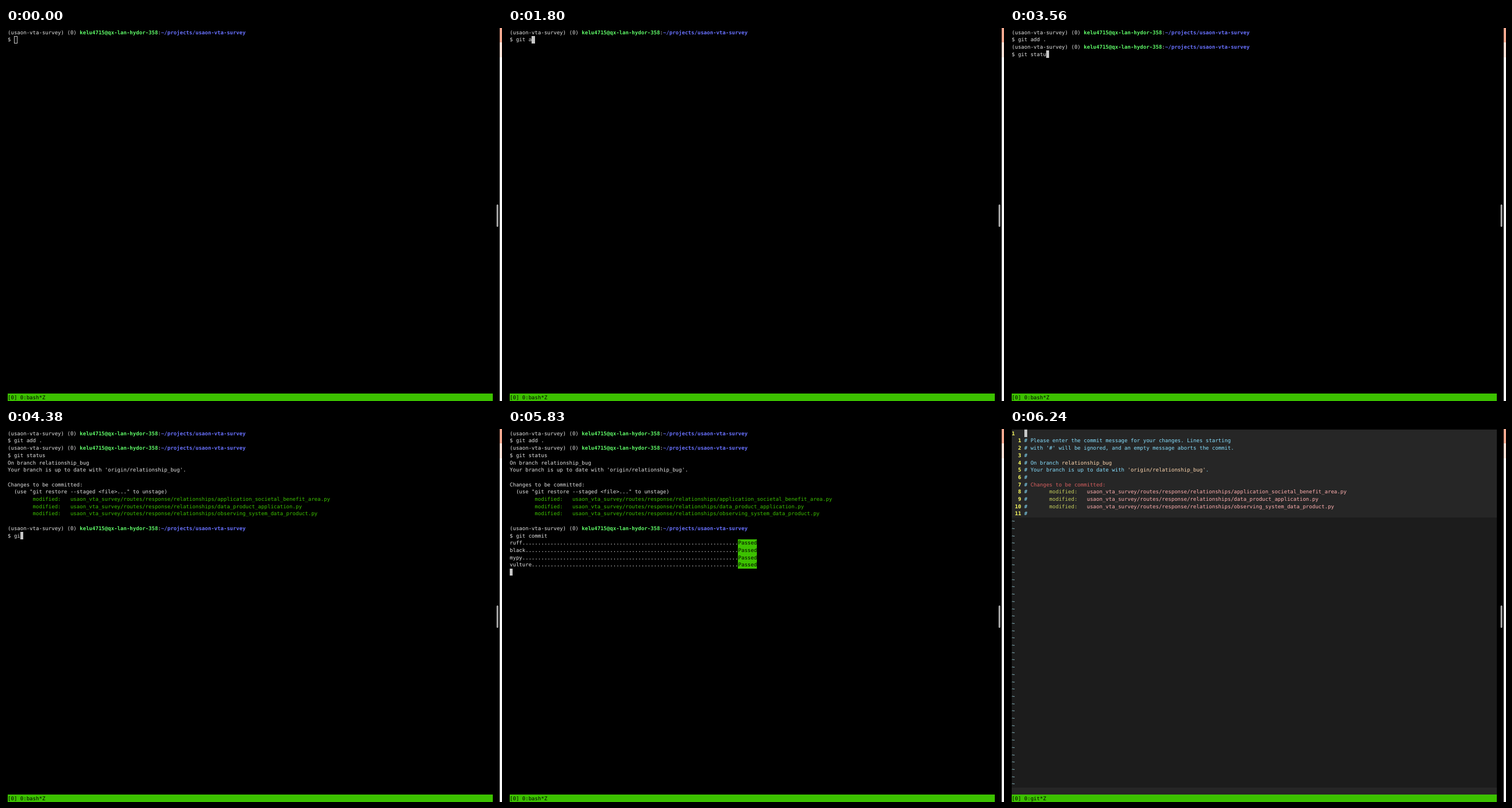
An HTML page with a canvas for the animation above (8470 ms loop, 863 px wide and 649 px high).

```html
<!DOCTYPE html>
<html lang="en">
<head>
<meta charset="utf-8">
<title>Terminal commit</title>
<style>
html, body { margin: 0; width: 100%; height: 100%; overflow: hidden; background: #000; }
canvas { display: block; }
</style>
</head>
<body>
<canvas id="stage" width="863" height="649"></canvas>
<script>
const ctx = document.getElementById('stage').getContext('2d');
const LOOP = 8470, COLS = 155, CW = 5.445, RH = 12.7, LEFT = 3, TOP = 1.3;
const WHITE = '#e2e2e2', GREEN = '#3cc100', LIME = '#5ffa68', BLUE = '#6871ff', BLOCK = '#c7c7c7';
const CYAN = '#87dfff', PEACH = '#ffd7af', PINK = '#ffafaf', RED = '#d75f5f', OLIVE = '#c5cc5c', YELLOW = '#ffff5f';

const DIR = 'usaon_vta_survey/routes/response/relationships/';
const FILES = ['application_societal_benefit_area', 'data_product_application', 'observing_system_data_product']
  .map(name => DIR + name + '.py');
const HOOKS = ['ruff', 'black', 'mypy', 'vulture'];

// Commands: prompt row, text, time of each key press
const COMMANDS = [
  { row: 1, text: 'git add .', keys: [1480, 1560, 1640, 1720, 1800, 1880, 2040, 2120, 2280] },
  { row: 3, text: 'git status', keys: [2770, 2840, 3000, 3080, 3240, 3240, 3400, 3480, 3560, 3720] },
  { row: 14, text: 'git commit', keys: [4300, 4380, 4460, 4540, 4700, 4780, 4860, 5030, 5110, 5270] }
];
const SHOWN = [0, 2520, 3970];

// Mouse pointer: time, x, y
const POINTER = [[350, 538, 351], [430, 474, 366], [510, 429, 370], [670, 396, 365], [750, 350, 355], [820, 324, 351], [1480]];

const colX = c => Math.round(LEFT + c * CW);
const rowY = r => Math.round(TOP + r * RH);
const passed = (times, t) => times.filter(at => at <= t).length;

function rect(color, x, y, x2, y2) {
  ctx.fillStyle = color;
  ctx.fillRect(x, y, x2 - x, y2 - y);
}

function cells(color, row, col, width, rows = 1) {
  rect(color, colX(col), rowY(row), colX(col + width), rowY(row + rows));
}

// Writes [text, color, bold] parts one after another on the character grid
function write(row, col, ...parts) {
  for (const [text, color = WHITE, bold] of parts) {
    ctx.font = `${bold ? 'bold ' : ''}9.045px "DejaVu Sans Mono", monospace`;
    ctx.fillStyle = color;
    for (const ch of text) {
      if (ch !== ' ') ctx.fillText(ch, LEFT + col * CW, TOP + row * RH + 9.4);
      col++;
    }
  }
}

function cursor(row, col, focused = true) {
  if (focused) return cells(BLOCK, row, col, 1);
  ctx.strokeStyle = BLOCK;
  ctx.lineWidth = 1;
  ctx.strokeRect(colX(col) + .5, rowY(row) + .5, 5, 12);
}

function prompt(row) {
  write(row, 0, ['(usaon-vta-survey) (0) '], ['kelu4715@qx-lan-hydor-358', LIME, true], [':'],
    ['~/projects/usaon-vta-survey', BLUE, true]);
  write(row + 1, 0, ['$']);
}

function status() {
  write(4, 0, ['On branch relationship_bug']);
  write(5, 0, ["Your branch is up to date with 'origin/relationship_bug'."]);
  write(7, 0, ['Changes to be committed:']);
  write(8, 2, ['(use "git restore --staged <file>..." to unstage)']);
  FILES.forEach((file, i) => write(9 + i, 8, ['modified:   ' + file, GREEN]));
}

function shell(t) {
  let at = [1, 2];
  if (t >= 3970) status();
  COMMANDS.forEach(({ row, text, keys }, i) => {
    if (t < SHOWN[i]) return;
    const n = passed(keys, t);
    prompt(row - 1);
    write(row, 2, [text.slice(0, n)]);
    at = [row, 2 + n];
  });
  if (t >= 3890 && t < 3970) at = [4, 0];
  if (t >= 5340) {
    const done = passed([5670, 5670, 5750, 5830], t);
    HOOKS.slice(0, done).forEach((hook, i) => {
      cells(GREEN, 15 + i, 73, 6);
      write(15 + i, 0, [hook.padEnd(73, '.')], ['Passed', '#000']);
    });
    at = [15 + done, 0];
  }
  cursor(...at, t >= 900);
}

function editor() {
  cells('#1c1c1c', 0, 0, COLS, 50);
  cells('#262626', 0, 0, COLS, 12);
  cells('#262626', 49, 0, COLS);
  const lines = [
    [[' Please enter the commit message for your changes. Lines starting', CYAN]],
    [[" with '#' will be ignored, and an empty message aborts the commit.", CYAN]],
    [],
    [[' On branch ', CYAN], ['relationship_bug', PEACH]],
    [[' Your branch is up to date with ', CYAN], ["'origin/relationship_bug'", PEACH], ['.', CYAN]],
    [],
    [[' Changes to be committed:', RED]],
    ...FILES.map(file => [['       modified:   ', OLIVE], [file, PINK]]),
    []
  ];
  write(0, 0, ['1', YELLOW, true]);
  lines.forEach((parts, i) =>
    write(i + 1, 0, [String(i + 1).padStart(3) + ' ', YELLOW, true], ['#', CYAN], ...parts));
  for (let row = 12; row < 49; row++) write(row, 0, ['~', '#a8e4ee']);
  cursor(0, 4);
}

function pointer(t) {
  const [, x, y] = POINTER[passed(POINTER.map(p => p[0]), t) - 1] || [];
  if (!x) return;
  const beam = new Path2D('M-2.5 -4.5Q0 -4.5 0 -2.5Q0 -4.5 2.5 -4.5M0 -3V3M-2.5 4.5Q0 4.5 0 2.5Q0 4.5 2.5 4.5');
  ctx.save();
  ctx.translate(x - .2, y);
  for (const [color, width] of [['#ddd', 2.8], ['#000', 1]]) {
    ctx.strokeStyle = color;
    ctx.lineWidth = width;
    ctx.stroke(beam);
  }
  ctx.restore();
}

function frame(now) {
  const t = now % LOOP;
  ctx.textRendering = 'geometricPrecision';
  rect('#000', 0, 0, 863, 649);
  if (t < 6150) shell(t);
  else if (t < 6240) {
    cells('#262626', 49, 0, COLS);
    write(49, 0, ['"~/projects/usaon-vta-survey/.git/COMMIT_EDITMSG" 12L, 539B', '#fff', true]);
  } else editor();
  cells(GREEN, 50, 0, COLS);
  write(50, 0, [t < 6150 ? '[0] 0:bash*Z' : '[0] 0:git*Z', '#000']);

  // Scroll thumb and the window edge behind the terminal
  ctx.fillStyle = '#adadad';
  ctx.beginPath();
  ctx.roundRect(853.6, 307, 3, 39, 1.5);
  ctx.fill();
  rect('#fafafa', 859, 0, 863, 649);
  rect('#fbe0d6', 859, 25, 863, 51);
  rect('#f5a88f', 859, 0, 863, 25);
  pointer(t);
  requestAnimationFrame(frame);
}
requestAnimationFrame(frame);
</script>
</body>
</html>
```
